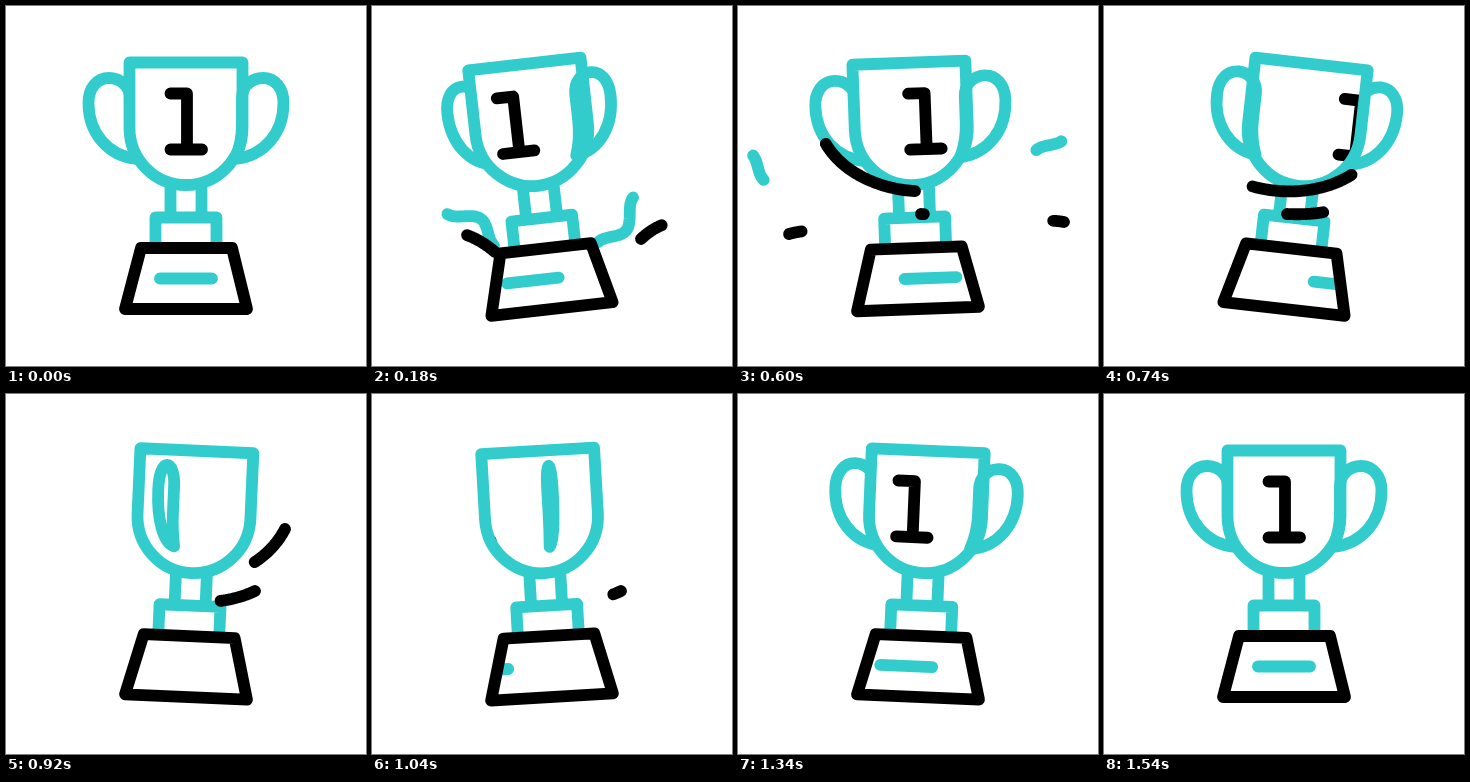
Animation of 360x360 px, one loop 2400 ms. Source, as an HTML page with a canvas:

```html
<!DOCTYPE html>
<html lang="en">
<head>
<meta charset="utf-8">
<title>Trophy</title>
<style>
  html, body { margin: 0; width: 100%; height: 100%; overflow: hidden; background: #fff; }
  canvas { display: block; }
</style>
</head>
<body>
<canvas id="stage" width="360" height="360"></canvas>
<script>
const ctx = document.getElementById('stage').getContext('2d');
const LOOP = 2400, END = 1540, RELEASE = 400;
const TEAL = '#33cccc';
const BLACK = '#000';
const CENTER = 180, FLOOR = 303;
const SLIDE_PERIOD = 200;

const mix = (a, b, u) => a + (b - a) * u;
const progress = (t, from, to) => Math.max(0, Math.min(1, (t - from) / (to - from)));
const easeInOut = u => (1 - Math.cos(Math.PI * u)) / 2;
const easeOut = u => Math.sin(Math.PI / 2 * u);
const windUp = t => easeOut(progress(t, 0, RELEASE)) ** 1.5;

// Lean back, then swing to and fro with shrinking angle and duration
function tiltAt(t) {
  let angle = -12.2, from = RELEASE + 5, duration = 381;
  if (t < from) return angle * windUp(t);
  for (let swing = 0; swing < 4; swing++) {
    const next = swing < 3 ? angle * -0.58 : 0;
    if (t < from + duration) return mix(angle, next, easeInOut((t - from) / duration));
    from += duration;
    duration *= 0.805;
    angle = next;
  }
  return 0;
}

// Share of the spin done after the release; a higher power starts faster
const spin = (t, power) => 1 - (1 - progress(t, RELEASE, END) ** 1.3) ** power;

const yawAt = t => t < RELEASE
  ? -50 * easeOut(t / RELEASE)
  : mix(-50, 180, spin(t, 1.6));

function slideAt(t) {
  const slide = t < RELEASE ? -30 * windUp(t) : mix(-30, SLIDE_PERIOD, spin(t, 1.9));
  return slide - SLIDE_PERIOD * Math.round(slide / SLIDE_PERIOD);
}

// Curves map u in 0..1 to a point
function bezier(...points) {
  return u => {
    let level = points;
    while (level.length > 1) {
      level = level.slice(1).map(([x, y], i) => [mix(level[i][0], x, u), mix(level[i][1], y, u)]);
    }
    return level[0];
  };
}

function squiggle([x0, y0], [x1, y1]) {
  const dx = x1 - x0, dy = y1 - y0, length = Math.hypot(dx, dy);
  return u => {
    const side = (7.5 * Math.sin(2 * Math.PI * 2.4 * (u - 0.09)) + 4 - 9 * u) / length;
    return [x0 + dx * u - dy * side, y0 + dy * u + dx * side];
  };
}

// tip and tail: [start ms, end ms] of each end's travel along the curve
const burst = (color, curve) => ({ color, curve, tip: [42, 388], tail: [313, 659] });
const streaks = [
  burst(TEAL, squiggle([124, 237], [14, 151])),
  burst(TEAL, squiggle([229, 238], [322, 134])),
  burst(BLACK, bezier([123, 246], [89, 217], [51, 228])),
  burst(BLACK, bezier([269, 233], [293, 210], [326, 216]))
];
const swooshes = [
  { color: BLACK, tip: [370, 830], tail: [580, 1000], curve: bezier([83, 128], [110, 196], [240, 210], [279, 135]) },
  { color: BLACK, tip: [590, 890], tail: [800, 1080], curve: bezier([183, 208], [222, 210], [249, 197]) }
];

const cup = new Path2D('M123.5 56.5H236.5V122A56.5 57 0 0 1 123.5 122Z');
const support = new Path2D('M164.5 182V209M195.5 182V209M149.5 238V211.5H210.5V238');
const plinth = new Path2D('M135 242H226L241 303H119Z');
const digit = new Path2D('M164.5 87.5H181V143.5M164.5 143.5H196');
const plate = new Path2D('M154 272.5H206');

function stroke(path, color) {
  ctx.strokeStyle = color;
  ctx.stroke(path);
}

function drawTrimmed({ color, curve, tip, tail }, t) {
  const head = progress(t, ...tip), end = progress(t, ...tail);
  if (head <= end) return;
  const path = new Path2D();
  for (let i = 0; i <= 40; i++) path.lineTo(...curve(mix(end, head, i / 40)));
  stroke(path, color);
}

// A handle turned about the vertical axis: radii shrink with the turn
function drawHandle(turn) {
  const x = radius => CENTER + radius * turn;
  const path = new Path2D();
  path.moveTo(x(49), 153);
  path.quadraticCurveTo(x(56), 137, x(56), 118);
  path.lineTo(x(56), 92);
  path.bezierCurveTo(x(56), 80, x(66), 72, x(77), 72);
  path.bezierCurveTo(x(89), 72, x(97.5), 82, x(97.5), 97);
  path.bezierCurveTo(x(97.5), 127, x(78), 150, x(49), 153);
  stroke(path, TEAL);
}

function drawSliding(path, color, frame, offset) {
  ctx.save();
  ctx.clip(frame);
  ctx.translate(offset, 0);
  stroke(path, color);
  ctx.restore();
}

function drawTrophy(t) {
  const yaw = yawAt(t) * Math.PI / 180;
  const offset = slideAt(t);
  const front = Math.cos(yaw) * (yaw <= 0 ? 1 : -1);

  ctx.save();
  ctx.translate(CENTER, FLOOR);
  ctx.rotate(tiltAt(t) * Math.PI / 180);
  ctx.translate(-CENTER, -FLOOR);

  drawHandle(-front);
  ctx.fillStyle = '#fff';
  ctx.fill(cup);
  drawSliding(digit, BLACK, cup, offset);
  stroke(support, TEAL);
  stroke(cup, TEAL);
  drawHandle(front);
  drawSliding(plate, TEAL, plinth, offset);
  stroke(plinth, BLACK);
  ctx.restore();
}

function draw(t) {
  ctx.fillStyle = '#fff';
  ctx.fillRect(0, 0, 360, 360);
  ctx.lineWidth = 11.8;
  ctx.lineCap = ctx.lineJoin = 'round';
  streaks.forEach(s => drawTrimmed(s, t));
  drawTrophy(t);
  swooshes.forEach(s => drawTrimmed(s, t));
}

const start = performance.now();
function tick() {
  draw((performance.now() - start) % LOOP);
  requestAnimationFrame(tick);
}
tick();
</script>
</body>
</html>
```
